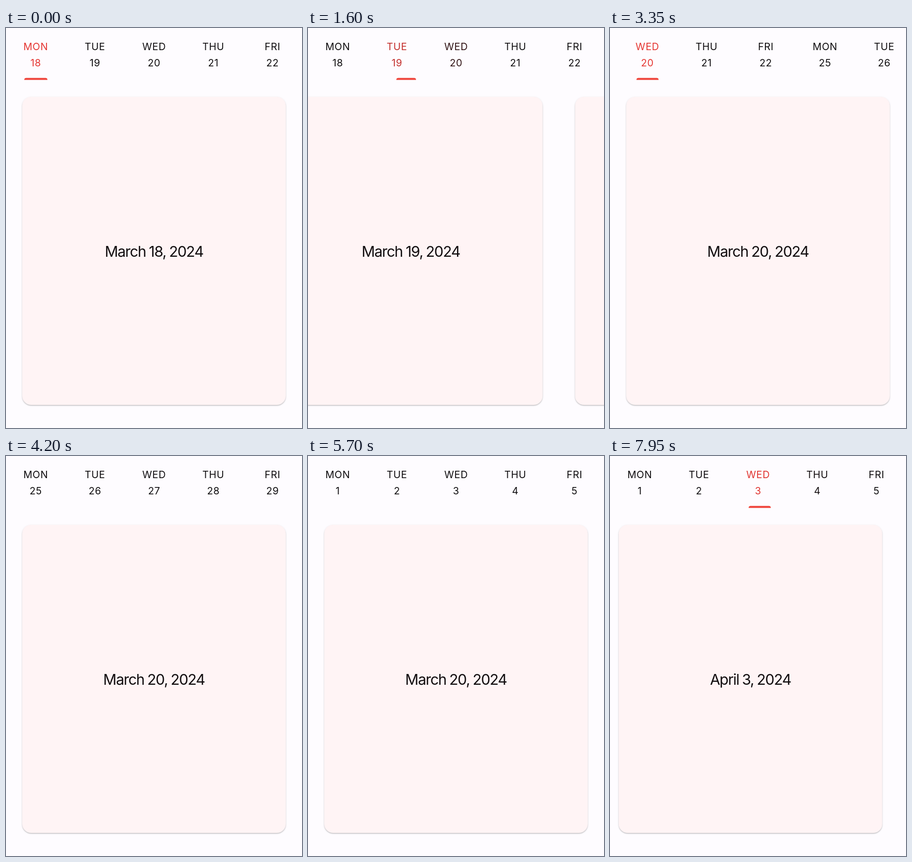
An HTML page that plays this animation: 600x813 px, repeating every 8 s.

```html
<!DOCTYPE html>
<html lang="en">
<head>
<meta charset="utf-8">
<title>Week calendar</title>
<style>
  /* page: selected card, week: visible week, picked/ink: tap feedback */
  @property --page { syntax: "<number>"; inherits: true; initial-value: 0; }
  @property --week { syntax: "<number>"; inherits: true; initial-value: 0; }
  @property --picked { syntax: "<number>"; inherits: true; initial-value: 0; }
  @property --ink { syntax: "<number>"; inherits: true; initial-value: 0; }

  html, body { margin: 0; width: 100%; height: 100%; overflow: hidden; background: #fefcff; }

  .stage {
    --week-swipe: linear(0, .003, .008, .02, .047, .092, .158, .25, .37, .575, .758, .875, .933, .962, .978, .9875, .993, .997, 1);
    position: relative;
    width: 600px;
    height: 813px;
    overflow: hidden;
    font-family: Inter, "Open Sans", sans-serif;
    font-optical-sizing: none;
    animation: page 8s infinite, week 8s var(--week-swipe) infinite, picked 8s infinite, ink 8s linear infinite;
  }

  .weeks, .cards { position: absolute; left: 0; top: 0; }
  .weeks { transform: translateX(calc(var(--week) * -600px)); }
  .cards { transform: translateX(calc(var(--page) * -600px)); }

  .week {
    position: absolute;
    left: calc(var(--i) * 600px);
    display: flex;
    width: 600px;
    height: 106px;
  }

  .day {
    --n: 99;
    --on: max(0, 1 - max(var(--page) - var(--n), var(--n) - var(--page)));
    position: relative;
    box-sizing: border-box;
    width: 120px;
    padding: 21.9px 0 0 .6px;
    text-align: center;
    font-size: 20px;
    line-height: 33.5px;
    letter-spacing: .6px;
    color: rgb(calc(16 + 213 * var(--on)) calc(14 + 41 * var(--on)) calc(16 + 35 * var(--on)));
  }
  .day.tapped { --on: calc(var(--picked) * min(1, 4 - var(--page))); }
  .day.next { --on: max(0, var(--page) - 3); }

  .ink {
    position: absolute;
    left: 240px;
    top: 8px;
    width: 120px;
    height: 96px;
    background: #ffe7e7;
    opacity: var(--ink);
  }

  .bar {
    position: absolute;
    top: 101px;
    height: 4px;
    border-radius: 4px 4px 0 0;
    background: #ef4339;
    transform: translateY(.4px);
  }
  .bar.first {
    --a: min(1, var(--page));
    --b: clamp(0, var(--page) - 1, 1);
    left: calc(37px + 124px * var(--a) + 116.5px * var(--b));
    width: calc(46.5px - 7.5px * var(--a) + 6.5px * var(--b));
  }
  .bar.last {
    --a: max(0, var(--page) - 3);
    left: calc(277.5px + 122.5px * var(--a));
    width: calc(45.5px - 4.5px * var(--a));
    opacity: var(--picked);
  }

  .card {
    position: absolute;
    left: calc(var(--i) * 600px + 33px);
    top: 139.5px;
    width: 534px;
    height: 626.5px;
    border-radius: 18px;
    background: #fff4f5;
    box-shadow: 0 1.5px 2px rgba(0, 0, 0, .2), 0 1px 4px rgba(0, 0, 0, .07);
    text-align: center;
    font-size: 30px;
    line-height: 36px;
    letter-spacing: -1.3px;
    word-spacing: -1px;
    color: #120e10;
  }
  .card span { position: absolute; left: 0; right: 0; top: 296px; }

  /* Drags followed by a spring settle, sampled evenly */
  @keyframes page {
    0% { --page: 0; }
    6.875% {
      --page: 0;
      animation-timing-function: linear(0, .003, .017, .058, .2, .467, .787, .907, .955, .975, .987, .992, .9955, .9975, .999, 1);
    }
    16.25% { --page: 1; }
    16.875% {
      --page: 1;
      animation-timing-function: linear(0, .003, .01, .023, .067, .15, .283, .433, .772, .898, .95, .973, .985, .991, .994, .997, .998, .999, 1);
    }
    28.125% { --page: 2; }
    78.965% { --page: 2; animation-timing-function: cubic-bezier(.25, .1, .25, 1); }
    82.715% { --page: 3; }
    97.5% { --page: 3; animation-timing-function: linear(0, .07, .25, .536, 1); }
    100% { --page: 3.0467; }
  }

  @keyframes week {
    0%, 36.875% { --week: 0; }
    48.125%, 59.375% { --week: 1; }
    70.625%, 100% { --week: 2; }
  }

  @keyframes picked {
    0%, 79.37% { --picked: 0; }
    79.375%, 100% { --picked: 1; }
  }

  @keyframes ink {
    0%, 79% { --ink: 0; }
    80.25%, 81.25% { --ink: 1; }
    85.625%, 100% { --ink: 0; }
  }
</style>
</head>
<body>
<div class="stage">
  <div class="weeks">
    <div class="week" style="--i: 0">
      <div class="day" style="--n: 0">MON<br>18</div>
      <div class="day" style="--n: 1">TUE<br>19</div>
      <div class="day" style="--n: 2">WED<br>20</div>
      <div class="day">THU<br>21</div>
      <div class="day">FRI<br>22</div>
      <div class="bar first"></div>
    </div>
    <div class="week" style="--i: 1">
      <div class="day">MON<br>25</div>
      <div class="day">TUE<br>26</div>
      <div class="day">WED<br>27</div>
      <div class="day">THU<br>28</div>
      <div class="day">FRI<br>29</div>
    </div>
    <div class="week" style="--i: 2">
      <div class="ink"></div>
      <div class="day">MON<br>1</div>
      <div class="day">TUE<br>2</div>
      <div class="day tapped">WED<br>3</div>
      <div class="day next">THU<br>4</div>
      <div class="day">FRI<br>5</div>
      <div class="bar last"></div>
    </div>
  </div>
  <div class="cards">
    <div class="card" style="--i: 0"><span>March 18, 2024</span></div>
    <div class="card" style="--i: 1"><span>March 19, 2024</span></div>
    <div class="card" style="--i: 2"><span>March 20, 2024</span></div>
    <div class="card" style="--i: 3"><span>April 3, 2024</span></div>
    <div class="card" style="--i: 4"><span>April 4, 2024</span></div>
  </div>
</div>
</body>
</html>
```
